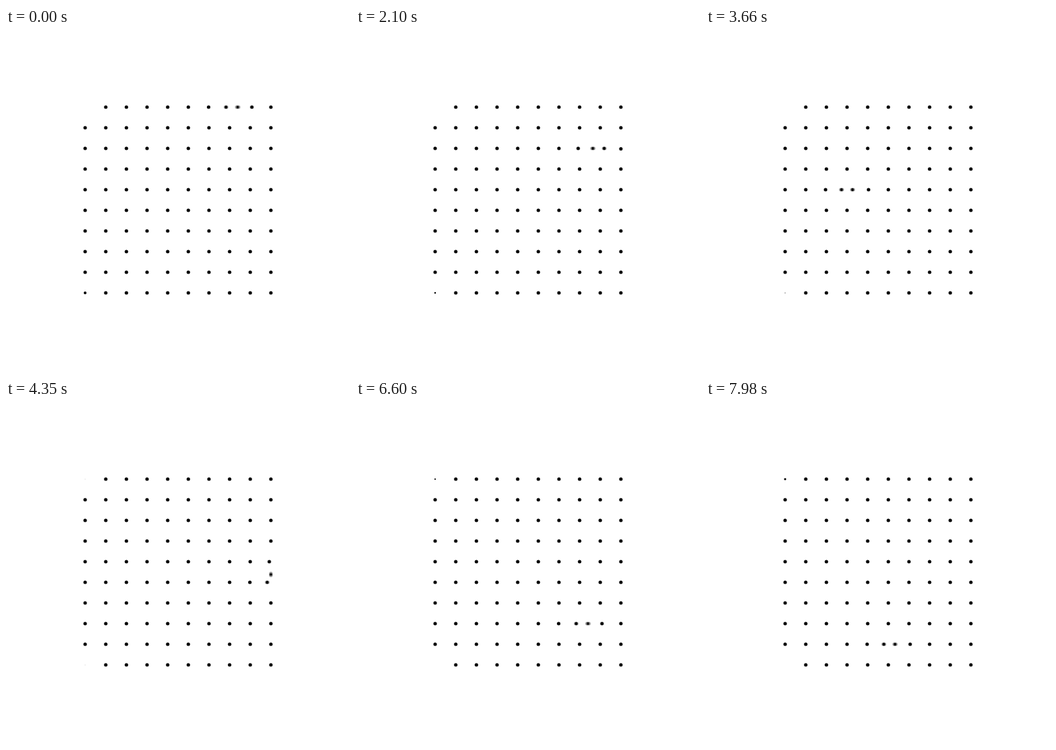
Recreate the animation shown at these times as an HTML page with a canvas. Size 500 px wide and 500 px high, loop 8 s.

```html
<!DOCTYPE html>
<html lang="en">
<head>
<meta charset="utf-8">
<title>Dot wave</title>
<style>
  html, body { margin: 0; width: 100%; height: 100%; overflow: hidden; background: #fff; }
  canvas { display: block; }
</style>
</head>
<body>
<canvas id="stage" width="500" height="500"></canvas>
<script>
const ctx = document.getElementById('stage').getContext('2d');

const LOOP = 8000, STEP = 30;                  // ms
const SIDE = 10, GAP = 30, ORIGIN = 115, RADIUS = 2.5;
const FIRST_START = -966, STAGGER = 102.5, MOVE = 540;
const SAMPLES = 5, SHUTTER = 30;               // motion blur

const clamp = (v, lo, hi) => Math.min(hi, Math.max(lo, v));

function ease(p) {
  return p < 0.5 ? 4 * p ** 3 : 1 - 4 * (1 - p) ** 3;
}

// Slots run through the grid row by row, changing direction each row.
function slot(i) {
  const row = Math.floor(i / SIDE), n = i % SIDE;
  const col = row % 2 ? SIDE - 1 - n : n;
  return { x: ORIGIN + col * GAP, y: ORIGIN + row * GAP };
}

function dot(x, y, r) {
  if (r <= 0) return;
  ctx.beginPath();
  ctx.arc(x, y, r, 0, 2 * Math.PI);
  ctx.fill();
}

function drawDots(t) {
  const last = SIDE * SIDE - 1;
  for (let i = 0; i < last; i++) {
    const p = ease(clamp((t - FIRST_START - i * STAGGER) / MOVE, 0, 1));
    const a = slot(i), b = slot(i + 1);
    dot(a.x + (b.x - a.x) * p, a.y + (b.y - a.y) * p, RADIUS);
  }
  const start = slot(0), end = slot(last);
  dot(start.x, start.y, clamp((t - 3700) * 0.00037, 0, RADIUS));
  dot(end.x, end.y, clamp((5050 - t) * 0.000396, 0, RADIUS));
}

function render(t) {
  ctx.clearRect(0, 0, 500, 500);
  ctx.globalCompositeOperation = 'lighter';    // sample opacities add up to 1
  ctx.globalAlpha = 1 / SAMPLES;
  for (let s = 0; s < SAMPLES; s++) {
    drawDots(t + ((s + 0.5) / SAMPLES - 0.5) * SHUTTER);
  }
}

const begin = performance.now();
function tick() {
  const t = (performance.now() - begin) % LOOP;
  render(Math.floor(t / STEP) * STEP);
  requestAnimationFrame(tick);
}
tick();
</script>
</body>
</html>
```
